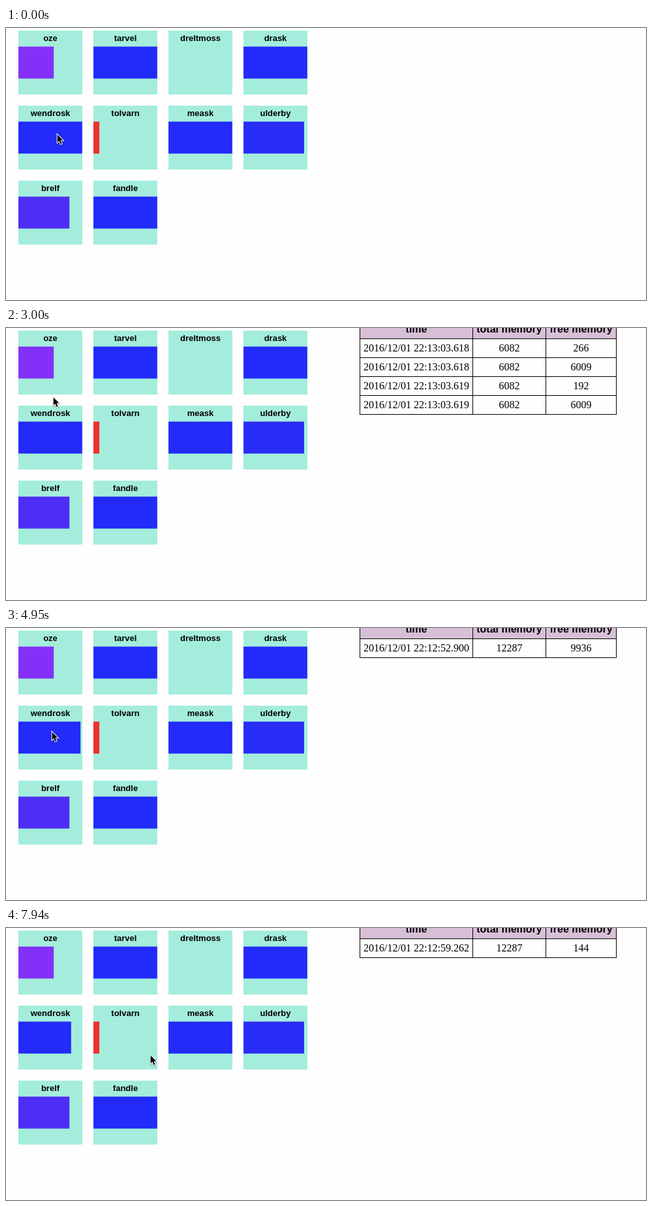
An HTML page with a canvas for the animation above (8000 ms loop, 981 by 417 pixels).

```html
<!DOCTYPE html>
<html lang="en">
<head>
<meta charset="utf-8">
<title>Memory monitor</title>
<style>
html, body { margin: 0; width: 100%; height: 100%; overflow: hidden; background: #fefefe; }
canvas { display: block; }
</style>
</head>
<body>
<canvas id="stage" width="981" height="417"></canvas>
<script>
const ctx = document.getElementById('stage').getContext('2d');
const LOOP = 8000, TICK = 150;
const SANS = '"Liberation Sans", Arial, sans-serif';
const SERIF = '"Liberation Serif", "Times New Roman", serif';
const BLUE = '#222bfa';

const hosts = 'oze tarvel dreltmoss drask wendrosk tolvarn meask ulderby brelf fandle'.split(' ');

// Free share of memory and bar colour; every other host is fully free.
const loaded = {
  oze: { free: 0.513, color: '#8430f8' },
  tolvarn: { free: 0.012, color: '#ee2f2f' },
  ulderby: { free: 0.944, color: '#292df8' },
  brelf: { free: 0.78, color: '#4e2ef6' }
};

const tables = [
  { start: 1350, total: 6082, rows: [['13:03.618', 266], ['13:03.618', 6009], ['13:03.619', 192], ['13:03.619', 6009]] },
  { start: 3150, total: 12287, rows: [['12:46.111', 12264]] },
  { start: 4950, total: 12287, rows: [['12:52.900', 9936]] },
  { start: 6300, total: 12287, rows: [['12:59.262', 144]] }
];

const moves = [
  { from: 1050, to: 1350, x: 77, y: 78 },
  { from: 1350, to: 1650, x: 69, y: 62 },
  { from: 2850, to: 3000, x: 72, y: 105 },
  { from: 3000, to: 3300, x: 72, y: 142 },
  { from: 3450, to: 4500, x: 70, y: 158 },
  { from: 5700, to: 6600, x: 157, y: 199 },
  { from: 7650, to: 7950, x: 221, y: 194 }
];

const mix = (a, b, p) => a + (b - a) * p;

function ease(t, from, to) {
  const p = Math.min(1, Math.max(0, (t - from) / (to - from)));
  return p * p * (3 - 2 * p);
}

function rect(color, x, y, w, h) {
  ctx.fillStyle = color;
  ctx.fillRect(x, y, w, h);
}

function label(text, x, y, font) {
  ctx.font = font;
  ctx.fillStyle = '#000';
  ctx.fillText(text, x, y);
}

function drawHosts(t) {
  hosts.forEach((name, i) => {
    const x = 19 + i % 4 * 115, y = 4 + Math.floor(i / 4) * 115;
    let { free, color } = loaded[name] || { free: 0.998, color: BLUE };
    if (name === 'wendrosk') free = mix(free, 0.809, ease(t, 4800, 5400));
    rect('#a4eddc', x, y, 98, 98);
    if (name !== 'dreltmoss') rect(color, x, y + 24.5, mix(8, 98, free), 49);
    label(name, x + 49, y + 16, `bold 13px ${SANS}`);
  });
}

function drawTable({ total, rows }) {
  const cells = rows.map(([time, free]) => [`2016/12/01 22:${time}`, total, free]);
  ctx.font = `16px ${SERIF}`;
  const second = 553 + Math.ceil(ctx.measureText(cells[0][0]).width);
  const edges = [542, second, second + 112, second + 220];
  const width = edges[3] - edges[0] + 1;
  const bottom = 16 + rows.length * 29;
  const drawRow = (row, y, font) => row.forEach((cell, i) =>
    label(cell, (edges[i] + edges[i + 1] + 1) / 2, y, font));

  rect('#d8bfd8', edges[0], 0, width, 16);
  drawRow(['time', 'total memory', 'free memory'], 7, `bold 16px ${SANS}`);
  cells.forEach((row, i) => drawRow(row, 36 + i * 29, `16px ${SERIF}`));
  for (let y = 16; y <= bottom; y += 29) rect('#000', edges[0], y, width, 1);
  for (const x of edges) rect('#000', x, 0, 1, bottom + 1);
}

const arrow = new Path2D('M.7 1.5V13.5L3.5 10.9L5.7 16L7.6 15.2L5.5 10.2H9.4Z');

function drawPointer(t) {
  let x = 78, y = 162;
  for (const move of moves) {
    const p = ease(t, move.from, move.to);
    x = mix(x, move.x, p);
    y = mix(y, move.y, p);
  }
  ctx.save();
  ctx.translate(Math.round(x), Math.round(y));
  ctx.shadowColor = 'rgba(0,0,0,.35)';
  ctx.shadowBlur = 2;
  ctx.shadowOffsetY = 1;
  ctx.strokeStyle = '#fff';
  ctx.lineWidth = 2;
  ctx.stroke(arrow);
  ctx.shadowColor = 'transparent';
  ctx.fillStyle = '#000';
  ctx.fill(arrow);
  ctx.restore();
}

function draw() {
  // The picture advances in ticks; the last one comes slightly early.
  const t = Math.floor((performance.now() % LOOP + 10) / TICK) * TICK;
  const table = tables.findLast(({ start }) => start <= t);
  ctx.textAlign = 'center';
  rect('#fefefe', 0, 0, 981, 417);
  drawHosts(t);
  if (table) drawTable(table);
  drawPointer(t);
  requestAnimationFrame(draw);
}
draw();
</script>
</body>
</html>
```
